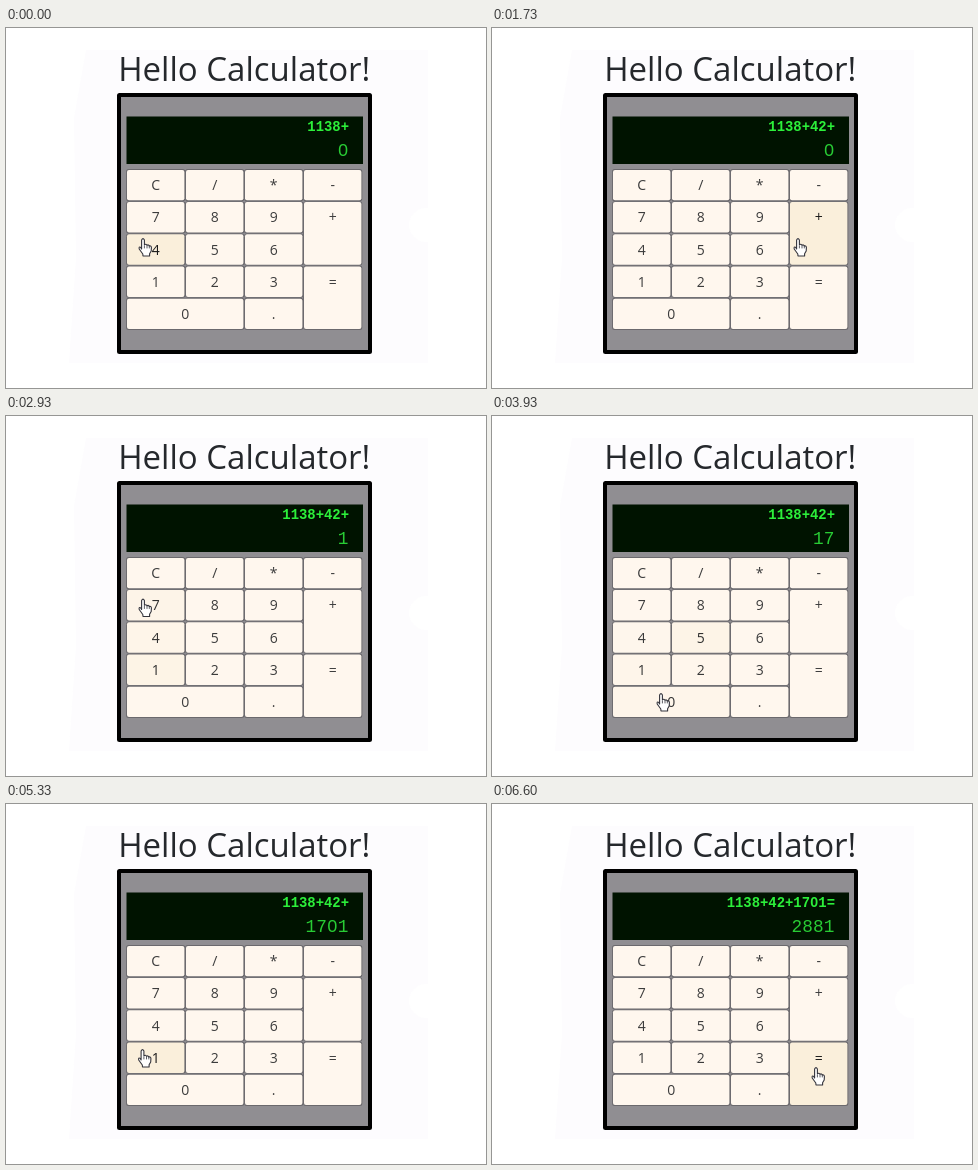
Write an HTML page with a canvas that moves like this. It is 480 by 360 pixels and loops after 6990 ms.

```html
<!DOCTYPE html>
<html lang="en">
<head>
<meta charset="utf-8">
<title>Hello Calculator!</title>
<style>
html, body { margin: 0; width: 100%; height: 100%; overflow: hidden; background: #fff; }
canvas { display: block; width: 480px; height: 360px; }
</style>
</head>
<body>
<canvas id="stage" width="480" height="360"></canvas>
<script>
const ctx = document.getElementById('stage').getContext('2d');
const LOOP = 6990;
const SANS = '"Open Sans", "Noto Sans", sans-serif';
const MONO = '"Liberation Mono", monospace';
const SCREEN = '#001300';

// label, column, row, column span, row span
const keys = [
  ['C', 0, 0], ['/', 1, 0], ['*', 2, 0], ['-', 3, 0],
  ['7', 0, 1], ['8', 1, 1], ['9', 2, 1], ['+', 3, 1, 1, 2],
  ['4', 0, 2], ['5', 1, 2], ['6', 2, 2],
  ['1', 0, 3], ['2', 1, 3], ['3', 2, 3], ['=', 3, 3, 1, 2],
  ['0', 0, 4, 2], ['.', 2, 4]
].map(([label, col, row, cols = 1, rows = 1]) => ({
  label,
  x: 120.7 + col * 59, y: 141.6 + row * 32.2,
  w: cols * 59 - 1, h: rows * 32.2 - 1.2
}));

// pointer stops: time, x, y
const route = [
  [0, 139, 219], [170, 139, 219], [530, 206, 257], [920, 206, 257],
  [1070, 308, 219], [1870, 308, 219], [2270, 152, 257], [2730, 152, 257],
  [2930, 139, 191.5], [3630, 139, 191.5], [3740, 189, 229], [3930, 171, 286],
  [4400, 171, 286], [4750, 138.5, 254], [5330, 138.5, 254], [5850, 326, 272],
  [LOOP, 326, 272]
];

// readout changes: time, expression, value
const readouts = [
  [0, '1138+', '0'], [130, '1138+', '4'], [870, '1138+', '42'],
  [1470, '1138+42+', '0'], [2670, '1138+42+', '1'], [3530, '1138+42+', '17'],
  [4130, '1138+42+', '170'], [4930, '1138+42+', '1701'],
  [5930, '1138+42+1701=', '2881']
];

function pointerAt(t) {
  const i = Math.max(1, route.findIndex(stop => stop[0] >= t));
  const [t0, x0, y0] = route[i - 1];
  const [t1, x1, y1] = route[i];
  const p = Math.max(0, (t - t0) / (t1 - t0));
  const e = p * p * (3 - 2 * p);
  return [x0 + (x1 - x0) * e, y0 + (y1 - y0) * e];
}

// Share of the last 250 ms spent over each key: a linear hover fade.
function hoverLevels(t) {
  const levels = new Map();
  const steps = 25;
  for (let i = 0; i < steps; i++) {
    const [px, py] = pointerAt(Math.max(0, t - i * 10));
    const x = px - 2, y = py - 7;
    const key = keys.find(k => x >= k.x && x < k.x + k.w && y >= k.y && y < k.y + k.h);
    if (key) levels.set(key, (levels.get(key) || 0) + 1 / steps);
  }
  return levels;
}

function box(x, y, w, h, r, fill) {
  ctx.beginPath();
  ctx.roundRect(x, y, w, h, r);
  ctx.fillStyle = fill;
  ctx.fill();
}

function label(text, x, y, font, fill) {
  ctx.font = font;
  ctx.fillStyle = fill;
  ctx.fillText(text, x, y);
}

// Right-aligned monospace line with open (undotted) zeros.
function digits(text, right, y, size, weight, fill) {
  const step = size * 0.6;
  ctx.textAlign = 'right';
  label(text, right, y, `${weight} ${size}px ${MONO}`, fill);
  const w = size * (weight === 'bold' ? 0.15 : 0.2);
  const h = size * 0.24;
  ctx.fillStyle = SCREEN;
  [...text].forEach((c, i) => {
    if (c !== '0') return;
    const cx = right - (text.length - i - 0.5) * step;
    ctx.fillRect(cx - w / 2, y - size * 0.33 - h / 2, w, h);
  });
}

function backdrop() {
  ctx.fillStyle = '#fff';
  ctx.fillRect(0, 0, 480, 360);
  ctx.beginPath();
  ctx.moveTo(80, 22);
  ctx.lineTo(422, 22);
  ctx.lineTo(422, 335);
  ctx.lineTo(63, 335);
  ctx.lineTo(70, 230);
  ctx.lineTo(68, 90);
  ctx.fillStyle = '#fdfcfe';
  ctx.fill();
  ctx.beginPath();
  ctx.arc(420, 197, 17, 0, Math.PI * 2);
  ctx.fillStyle = '#fff';
  ctx.fill();
}

function drawKey(k, level) {
  const mix = (a, b) => Math.round(a + (b - a) * level);
  box(k.x - 0.6, k.y - 0.6, k.w + 1.2, k.h + 1.2, 2.5, '#6b696d');
  box(k.x + 0.3, k.y + 0.3, k.w - 0.6, k.h - 0.6, 2,
    `rgb(${mix(255, 250)},${mix(247, 239)},${mix(238, 219)})`);
  const ink = mix(60, 25);
  ctx.textAlign = 'center';
  label(k.label, k.x + k.w / 2, k.y + 20.6, `14px ${SANS}`, `rgb(${ink},${ink},${ink})`);
}

function drawHand(x, y) {
  ctx.save();
  ctx.translate(x, y);
  ctx.beginPath();
  ctx.moveTo(-3.4, 2);
  ctx.lineTo(-3.4, -7);
  ctx.quadraticCurveTo(-2, -9.8, -0.6, -7);
  ctx.lineTo(-0.6, -2.2);
  ctx.quadraticCurveTo(1, -3.6, 2, -1.8);
  ctx.quadraticCurveTo(3.6, -2.8, 4.3, -1);
  ctx.quadraticCurveTo(6.3, -1.6, 6.4, 0.6);
  ctx.lineTo(6.2, 4);
  ctx.lineTo(4.6, 6.8);
  ctx.lineTo(4.6, 9);
  ctx.lineTo(-2, 9);
  ctx.lineTo(-2.2, 7);
  ctx.lineTo(-5.8, 2);
  ctx.quadraticCurveTo(-6.4, -0.8, -4.2, 0.4);
  ctx.closePath();
  ctx.fillStyle = '#fff';
  ctx.fill();
  ctx.strokeStyle = '#34343c';
  ctx.lineWidth = 1.1;
  ctx.lineJoin = 'round';
  ctx.stroke();
  ctx.beginPath();
  for (const fx of [-0.6, 2, 4.3]) {
    ctx.moveTo(fx, -1.6);
    ctx.lineTo(fx, 1.4);
  }
  ctx.lineWidth = 0.8;
  ctx.stroke();
  ctx.restore();
}

function draw(t) {
  backdrop();
  ctx.textAlign = 'center';
  label('Hello Calculator!', 238.3, 52.5, `33px ${SANS}`, '#25282c');

  box(111, 65, 255, 261, 2.5, '#000');
  box(115, 69, 247, 253, 0, '#908e92');
  box(120.5, 88.5, 236.5, 47.5, 0, SCREEN);

  const [, expression, value] = readouts.filter(r => r[0] <= t).pop();
  digits(expression, 343, 102.5, 13.9, 'bold', '#2cf03a');
  digits(value, 342.3, 128, 17.8, 'normal', '#28cc34');

  const levels = hoverLevels(t);
  for (const k of keys) drawKey(k, levels.get(k) || 0);
  drawHand(...pointerAt(t));
}

const start = performance.now();
function frame() {
  draw((performance.now() - start) % LOOP);
  requestAnimationFrame(frame);
}
frame();
</script>
</body>
</html>
```
